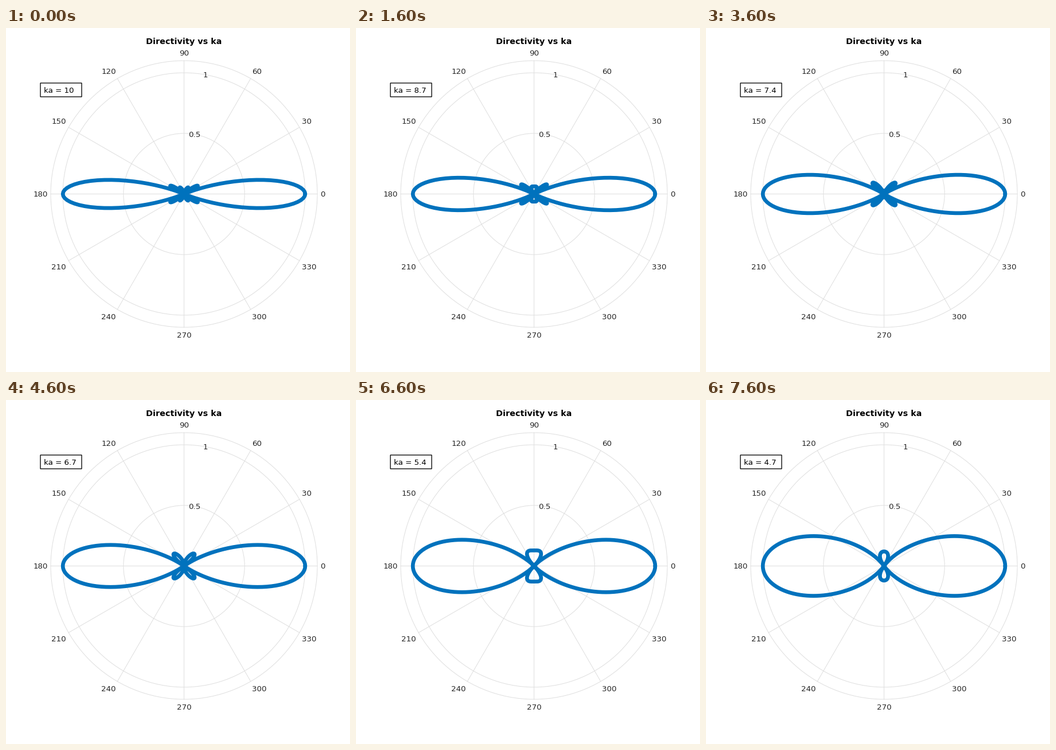
A matplotlib script that plays this animation: 600x600 px, repeating every 8000 ms.

```python
import numpy as np
import matplotlib.pyplot as plt
from matplotlib.animation import FuncAnimation
from matplotlib.patches import Circle, Rectangle

SIZE, DPI = 600, 100
PT = 72 / DPI                     # points per pixel
CX, CY, R_OUT = 310.5, 289.5, 232.5
UNIT = R_OUT / 1.1                # pixels for a directivity of 1
GRID, INK, BLUE = "#dfdfdf", "#262626", "#0072bd"
LABEL = 13.33

plt.rcParams["font.family"] = "DejaVu Sans"
fig = plt.figure(figsize=(SIZE / DPI, SIZE / DPI), dpi=DPI, facecolor="white")
ax = fig.add_axes([0, 0, 1, 1])
ax.set_xlim(0, SIZE)
ax.set_ylim(SIZE, 0)
ax.axis("off")


def label(x, y, text, size=LABEL, ha="center", color=INK, **kw):
    return ax.text(x, y, text, fontsize=size * PT, ha=ha, va="baseline",
                   color=color, zorder=4, **kw)


# polar grid
for r in (0.5 * UNIT, UNIT, R_OUT):
    ax.add_patch(Circle((CX, CY), r, fill=False, ec=GRID, lw=PT, zorder=1))
for deg in range(0, 180, 30):
    dx = R_OUT * np.cos(np.radians(deg))
    dy = R_OUT * np.sin(np.radians(deg))
    ax.plot([CX - dx, CX + dx], [CY + dy, CY - dy], color=GRID, lw=PT,
            snap=False, zorder=1)

# angle labels: x centre and baseline
spots = [(552, 294), (524.5, 167), (437.5, 80), (310.5, 48),
         (179, 80), (92, 167), (60, 294), (92, 421),
         (179, 508), (310.5, 540), (441.5, 508), (528.5, 421)]
for i, (x, y) in enumerate(spots):
    label(x, y, str(30 * i))
label(328.5, 190, "0.5")
label(347.5, 86, "1")
label(310.5, 28, "Directivity vs ka", size=14.4, color="black", weight="bold")

ax.add_patch(Rectangle((60, 96), 72, 24, fc="white", ec="black",
                       lw=1.33 * PT, snap=False, zorder=3))
readout = label(66, 113, "", ha="left", color="black")
curve, = ax.plot([], [], color=BLUE, lw=6.67 * PT, zorder=2,
                 solid_joinstyle="round", solid_capstyle="round")

theta = np.radians(np.arange(361))
tau = (np.arange(64) + 0.5) * np.pi / 64


def directivity(ka):
    """|2 J1(x) / x| with x = ka sin(theta), from the integral form."""
    x = ka * np.sin(theta)[:, None]
    return np.abs(2 * np.mean(np.cos(x * np.cos(tau)) * np.sin(tau) ** 2, axis=1))


def draw(frame):
    step = (frame + 4) // 5       # first step lasts 100 ms, the others 500 ms
    ka = 10 - 0.33 * step
    r = UNIT * directivity(ka)
    curve.set_data(CX + r * np.cos(theta), CY - r * np.sin(theta))
    readout.set_text(f"ka = {ka:.2g}")
    return curve, readout


anim = FuncAnimation(fig, draw, frames=80, interval=100, repeat=True,
                     repeat_delay=0, blit=False)
plt.show()
```
